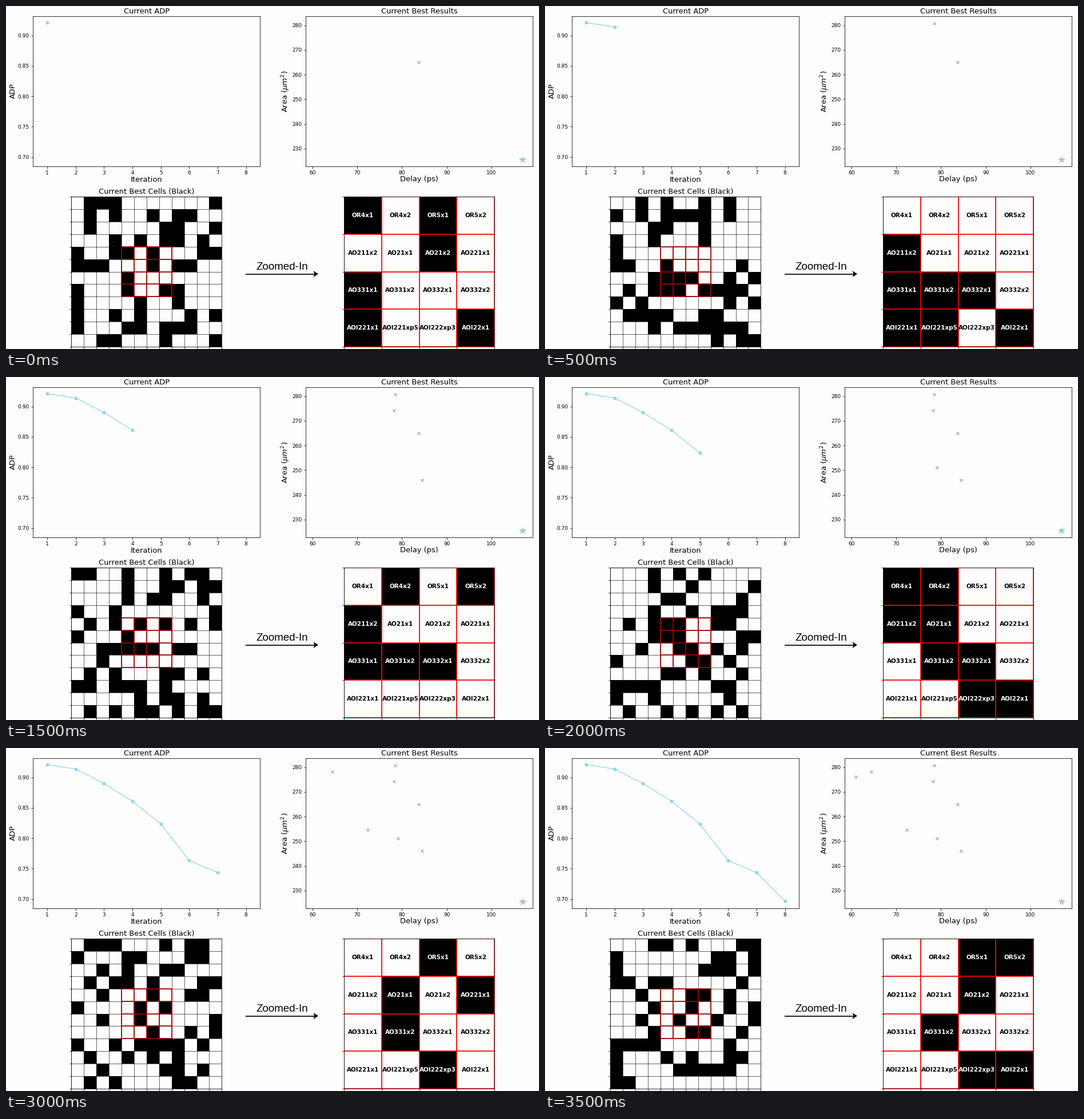
Recreate the animation shown at these times as a matplotlib script. Size 932 by 601 pixels, loop 4 s.

```python
import matplotlib.pyplot as plt
import numpy as np
from matplotlib.animation import FuncAnimation
from matplotlib.colors import ListedColormap
from matplotlib.patches import Polygon

W, H, DPI = 932, 601, 72
STEPS, INTERVAL = 8, 500
GRID, ZOOM, START = 12, 4, 4
DENSITY = 0.42
PAPER = "#fdfdfd"

ADP = [0.921, 0.914, 0.890, 0.861, 0.8235, 0.7635, 0.7435, 0.6965]
DELAY = [83.7, 78.45, 78.2, 84.4, 79.1, 72.3, 64.4, 60.85]
AREA = [265.2, 280.9, 274.5, 246.2, 251.2, 254.7, 278.3, 276.3]

NAMES = """OR4x1 OR4x2 OR5x1 OR5x2
AO211x2 AO21x1 AO21x2 AO221x1
AO331x1 AO331x2 AO332x1 AO332x2
AOI221x1 AOI221xp5 AOI222xp3 AOI22x1""".split()

# Chosen cells of the zoomed window at each step, by index into NAMES
CHOSEN = [
    [0, 2, 6, 8, 12, 15],
    [4, 8, 9, 10, 12, 13, 15],
    [1, 4, 6, 8, 10, 15],
    [1, 3, 4, 8, 9, 10],
    [0, 1, 4, 5, 9, 10, 14, 15],
    [4, 7, 12, 14],
    [2, 5, 7, 9, 14],
    [2, 3, 6, 9, 14, 15],
]

plt.rcParams.update({
    "font.family": "DejaVu Sans", "axes.titlesize": 13, "axes.titlepad": 5,
    "axes.labelsize": 13, "axes.labelpad": 0.5, "axes.facecolor": PAPER,
    "xtick.labelsize": 9, "ytick.labelsize": 9})
fig = plt.figure(figsize=(W / DPI, H / DPI), dpi=DPI, facecolor=PAPER)


def add_axes(x, y, w, h):
    """Axes placed by pixels from the top left corner."""
    return fig.add_axes([x / W, 1 - (y + h) / H, w / W, h / H])


def side_label(text, x):
    fig.text(x / W, 1 - 149 / H, text, size=13, rotation=90,
             rotation_mode="anchor", ha="center", va="baseline")


def cell_axes(x, n):
    """Square board of n by n cells with bare ticks."""
    ax = add_axes(x, 334, 263, 263)
    ax.set(xlim=(0, n), ylim=(n, 0), xticks=range(n + 1), yticks=range(n + 1))
    ax.tick_params(labelbottom=False, labelleft=False)
    mesh = ax.pcolormesh(np.zeros((n, n)), vmin=0, vmax=1,
                         cmap=ListedColormap([PAPER, "black"]))
    return ax, mesh


def rule_lines(ax, first, last, color, width, order):
    marks = range(first, last + 1)
    style = dict(colors=color, lw=width, zorder=order)
    ax.hlines(marks, first, last, **style)
    ax.vlines(marks, first, last, **style)


def board_cells(step):
    """Random board around the chosen window."""
    rng = np.random.default_rng(step)
    cells = (rng.random((GRID, GRID)) < DENSITY).astype(float)
    window = np.isin(range(ZOOM * ZOOM), CHOSEN[step]).reshape(ZOOM, ZOOM)
    cells[START:START + ZOOM, START:START + ZOOM] = window
    return cells, window


# ADP curve
ax_adp = add_axes(47.4, 18, 397, 263)
ax_adp.set(xlim=(0.5, 8.5), ylim=(0.6847, 0.9316), xticks=range(1, 9),
           yticks=np.arange(0.70, 0.91, 0.05), title="Current ADP",
           xlabel="Iteration")
ax_adp.yaxis.set_major_formatter("{x:.2f}")
side_label("ADP", 16)
curve, = ax_adp.plot([], [], "-o", color="#93d5ea", lw=1.3, ms=5.5, mew=0.5)

# Area against delay
ax_best = add_axes(524.4, 18, 397, 263)
ax_best.set(xlim=(58.53, 109.27), ylim=(222.75, 283.65),
            xticks=range(60, 101, 10), yticks=range(230, 281, 10),
            title="Current Best Results", xlabel="Delay (ps)")
side_label(r"Area ($\mu m^2$)", 493.5)
ax_best.plot(106.95, 225.6, "*", color="#a4c8c6", ms=13, mew=0.8)
crosses, = ax_best.plot([], [], "x", color="#9c93c9", ms=5, mew=1.1)

# Cell boards
ax_cells, board = cell_axes(114.4, GRID)
ax_cells.set_title("Current Best Cells (Black)")
rule_lines(ax_cells, 0, GRID, "black", 0.6, 2)
rule_lines(ax_cells, START, START + ZOOM, "#a00505", 1.8, 3)

ax_zoom, zoom = cell_axes(591, ZOOM)
rule_lines(ax_zoom, 0, ZOOM, "#ee0808", 1.8, 2)
labels = [ax_zoom.text(i % ZOOM + 0.5, i // ZOOM + 0.5, name, size=10.4,
                       weight="bold", ha="center", va="center", zorder=4)
          for i, name in enumerate(NAMES)]

# Arrow between the boards
ax_arrow = fig.add_axes([0, 0, 1, 1], facecolor="none")
ax_arrow.set(xlim=(0, W), ylim=(H, 0))
ax_arrow.axis("off")
ax_arrow.plot([419, 541], [469.5, 469.5], color="black", lw=1.7,
              solid_capstyle="butt")
ax_arrow.add_patch(Polygon([(546, 469.5), (537.5, 464), (539.5, 469.5),
                            (537.5, 475)], color="black", lw=0))
ax_arrow.text(483.2, 462, "Zoomed-In", family="Liberation Sans", size=18.8,
              ha="center", va="baseline")


def draw(step):
    n = step + 1
    curve.set_data(range(1, n + 1), ADP[:n])
    crosses.set_data(DELAY[:n], AREA[:n])
    cells, window = board_cells(step)
    board.set_array(cells)
    zoom.set_array(window.astype(float))
    for label, on in zip(labels, window.flat):
        label.set_color(PAPER if on else "black")
    return [curve, crosses, board, zoom, *labels]


anim = FuncAnimation(fig, draw, frames=STEPS, interval=INTERVAL,
                     repeat=True, repeat_delay=0, blit=False)
plt.show()
```
